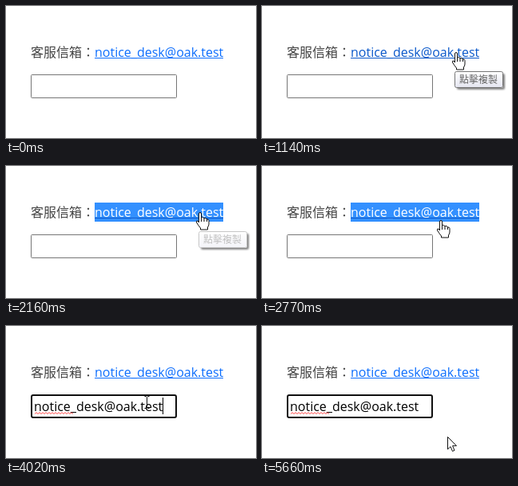
Animation of 313x166 px, one loop 5.73 s. Source, as an HTML page:

```html
<!DOCTYPE html>
<html lang="zh-Hant">
<head>
<meta charset="utf-8">
<style>
  html, body { margin: 0; width: 100%; height: 100%; overflow: hidden; background: #fff; }
  svg { display: block; width: 100%; height: 100%; }
  text { font: 16px "Open Sans", "Noto Sans", sans-serif; }
  .cjk { font-family: "Noto Sans CJK TC", "Noto Sans CJK", sans-serif; font-weight: 300; }
  #tip text { font-size: 12px; }
  #click { mix-blend-mode: multiply; }
</style>
</head>
<body>
<svg viewBox="0 0 313 166">
  <defs>
    <linearGradient id="tipFill" x2="0" y2="1">
      <stop stop-color="#fff"/><stop offset="1" stop-color="#e4e5f0"/>
    </linearGradient>
    <filter id="blur"><feGaussianBlur stdDeviation="1"/></filter>
  </defs>

  <text class="cjk" x="31" y="64" fill="#444">客服信箱：</text>
  <rect id="selection" x="111" y="46" width="161" height="24" fill="#3390ff"/>
  <text id="link" x="111" y="64">notice_desk@oak.test</text>
  <rect id="underline" x="111" y="65" width="161" height="1"/>

  <rect id="box" x="31.5" y="86.5" width="182" height="29" rx="1" fill="#fff" stroke="#767676"/>
  <rect id="focus" x="32" y="87" width="181" height="28" rx="2" fill="#fff" stroke="#101010" stroke-width="2"/>
  <g id="pasted">
    <text x="35" y="107">notice_desk@oak.test</text>
    <path id="squiggle" fill="none" stroke="#f33" stroke-width=".9"/>
  </g>
  <rect id="caret" y="90" width="1" height="21"/>

  <g id="tooltip">
    <rect x="244" y="85" width="60" height="20" rx="2" opacity=".5" filter="url(#blur)"/>
    <rect x="241" y="82" width="61" height="21" rx="2" fill="#fff"/>
    <g id="tip">
      <rect x="241.5" y="82.5" width="60" height="20" rx="2" fill="url(#tipFill)" stroke="#767676"/>
      <text class="cjk" x="247" y="96.5" fill="#666">點擊複製</text>
    </g>
  </g>

  <circle id="click" r="12" fill="#f7f04a"/>
  <g id="pointer" fill="#fff" stroke="#111" stroke-linejoin="round">
    <path id="arrow" d="M.5 .5V16L4 12.7 6.5 18.5 9 17.4 6.6 11.7H11.5Z"/>
    <g id="hand">
      <path d="M-1.5 2Q-1.5 .5 0 .5T1.5 2V7Q2 6 3.5 6.5T5 8Q6 7 7 7.5T8.5 9Q10.5 8.5 11 10.5V15Q11 17 9.5 19V22H.5V20Q-2 17 -4.5 13Q-5 10.5 -3 11L-1.5 13Z"/>
      <path d="M1.5 7V12M5 8V12M8.5 9V12" fill="none"/>
    </g>
    <path id="beam" fill="none" d="M-.5 -6.5H1.5L2.5 -5.5L3.5 -6.5H5.5M2.5 -5.5V7.5M-.5 8.5H1.5L2.5 7.5L3.5 8.5H5.5"/>
  </g>
</svg>
<script>
const LOOP = 5730;
const $ = id => document.getElementById(id);
const show = (id, on) => $(id).style.display = on ? '' : 'none';
const within = (t, from, to) => t >= from && t < to;

// Progress in equal jumps: the first lands at start, the last reaches 1 at end.
const stepped = (t, start, end, steps) => t < start ? 0
  : Math.min(1, (Math.floor((t - start) / (end - start) * (steps - 1)) + 1) / steps);
const easeOut = p => p * (1.5 - p / 2);
const lerp = (a, b, p) => a + (b - a) * p;

const entry = { x: 236, y: 166 };
const overLink = { x: 243, y: 58 };
const inField = { x: 174, y: 95 };
const exit = { x: 232, y: 139 };

function pointerAt(t) {
  const move = (from, to, ...timing) => {
    const p = easeOut(stepped(t, ...timing));
    return { x: Math.round(lerp(from.x, to.x, p)), y: Math.round(lerp(from.y, to.y, p)) };
  };
  if (t < 2770) return move(entry, overLink, 70, 510, 7);
  if (t < 5580) return move(overLink, inField, 2770, 3100, 5);
  return move(inField, exit, 5580, 5660, 2);
}

let wave = 'M36 110.5';
for (let x = 36; x < 81; x += 4) wave += 'l2 -1.8l2 1.8';
$('squiggle').setAttribute('d', wave);

function draw(t) {
  const { x, y } = pointerAt(t);
  const onLink = within(x, 111, 273) && within(y, 46, 71);
  const inBox = within(x, 31, 214) && within(y, 86, 116);
  show('pointer', t >= 70);
  $('pointer').setAttribute('transform', `translate(${x} ${y})`);
  show('hand', onLink);
  show('beam', inBox);
  show('arrow', !onLink && !inBox);

  show('click', within(t, 1990, 2080) || within(t, 3180, 3330));
  $('click').setAttribute('cx', x);
  $('click').setAttribute('cy', y);

  const selected = within(t, 2080, 3180);
  const linkColor = onLink ? '#0a58ca' : '#0d6efd';
  show('selection', selected);
  $('link').setAttribute('fill', selected ? '#fff' : linkColor);
  $('underline').setAttribute('fill', selected ? '#0a58ca' : linkColor);

  show('tooltip', within(t, 990, 2310));
  $('tip').style.opacity = stepped(t, 990, 1140, 3) - stepped(t, 1990, 2310, 5);

  const focused = t >= 3180;
  const pasted = t >= 4020;
  show('box', !focused);
  show('focus', focused);
  show('pasted', pasted);
  show('caret', within(t, 3180, 3700) || within(t, 4020, 4570) || within(t, 5100, 5580));
  $('caret').setAttribute('x', pasted ? 196 : 35);
}

const start = performance.now();
function frame() {
  draw((performance.now() - start) % LOOP);
  requestAnimationFrame(frame);
}
frame();
</script>
</body>
</html>
```
